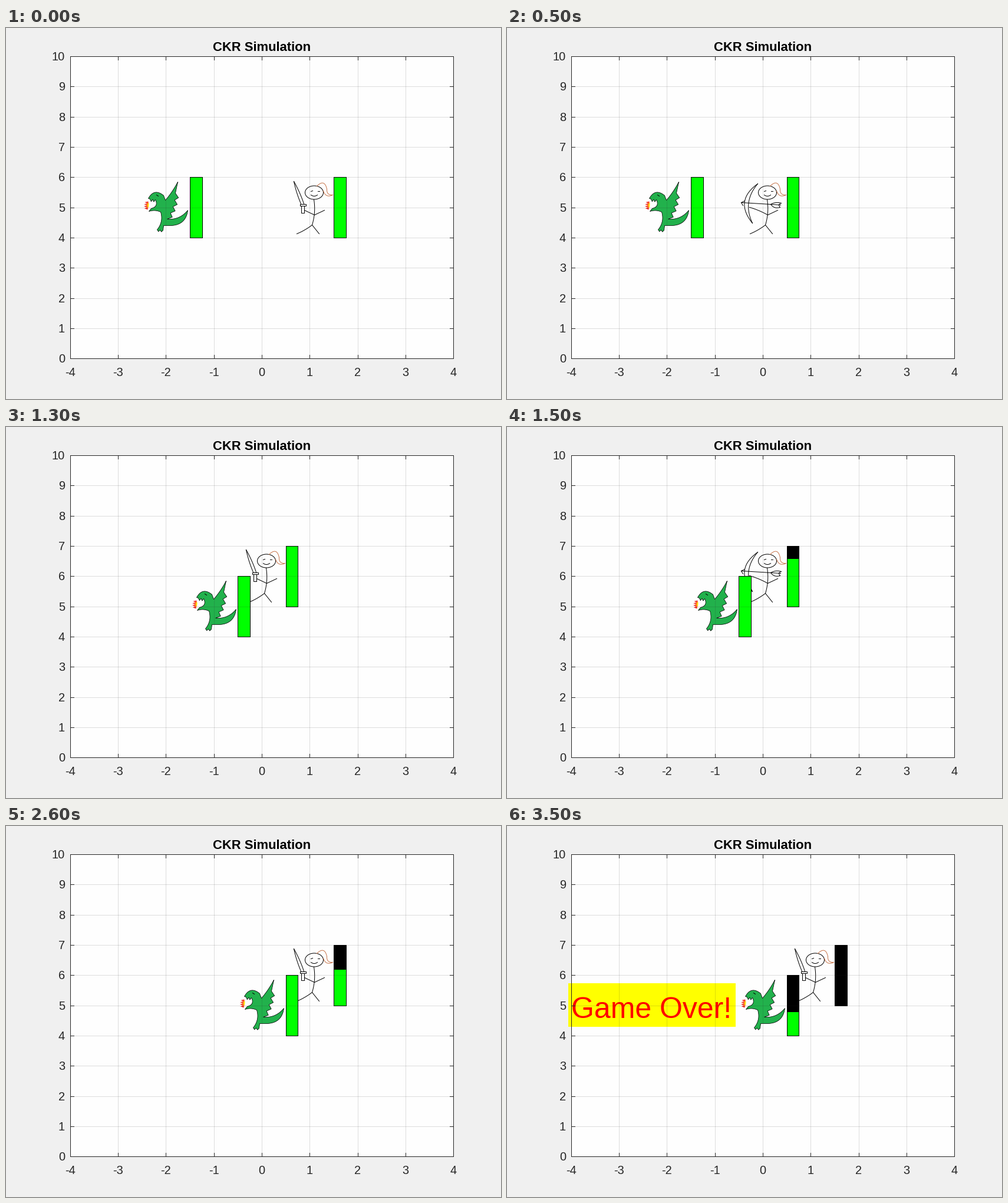
A matplotlib script for the animation above (4000 ms loop, 840 by 630 pixels).

```python
import numpy as np
import matplotlib.pyplot as plt
from matplotlib.animation import ArtistAnimation
from matplotlib.patches import Ellipse, Polygon, Rectangle

DPI = 70
PT = 72 / DPI  # points per pixel
INK, TICK, GREEN, HAIR = "#000000", "#262626", "#22b14c", "#c8764c"
plt.rcParams["font.family"] = "Liberation Sans"
plt.rcParams["axes.unicode_minus"] = False

fig = plt.figure(figsize=(840 / DPI, 630 / DPI), dpi=DPI, facecolor="#f0f0f0")
ax = fig.add_axes([0, 0, 1, 1])
ax.set_xlim(0, 840)
ax.set_ylim(629, -1)  # snapped strokes then fall on whole pixel rows
ax.axis("off")


def px(x):
    return 108.8 + 81.3 * (x + 4)


def py(y):
    return round(560.4 - 51.34 * y)


def place(x, y):
    """Centre of a sprite, on the middle of a pixel."""
    return np.array([round(px(x)) + 0.5, py(y) - 0.5])


def edge(a, b, bulge=0, teeth=0, depth=0):
    """Curve from a to b, bowed sideways by bulge, optionally saw-toothed."""
    a, b = np.array(a, float), np.array(b, float)
    dx, dy = b - a
    normal = np.array([-dy, dx]) / np.hypot(dx, dy)
    t = np.linspace(0, 1, 2 * teeth + 1 if teeth else 16)[:, None]
    points = a + (b - a) * t + 4 * bulge * t * (1 - t) * normal
    if teeth:
        points[1::2] += depth * normal
    return points


def line(points, color=INK, width=1, z=2, **kw):
    return ax.plot(*np.transpose(points), color=color, lw=width * PT, zorder=z, **kw)[0]


def fill(points, color, ec="none", z=4):
    return ax.add_patch(Polygon(points, fc=color, ec=ec, lw=0.75 * PT, zorder=z))


def box(x0, y0, x1, y1, color, ec="none", z=2):
    return ax.add_patch(Rectangle((x0, y0), x1 - x0, y1 - y0, fc=color, ec=ec,
                                  lw=PT, zorder=z))


def label(x, y, text, size, color=TICK, ha="center", z=6, **kw):
    return ax.text(x, y, text, fontsize=size * PT, color=color, ha=ha,
                   va="baseline", zorder=z, **kw)


def draw_axes():
    left, right = round(px(-4)), round(px(4))
    top, bottom = py(10), py(0)
    tick = 6
    box(left, top, right, bottom, "#fefefe", z=0)
    for x in range(-4, 5):
        u = round(px(x))
        line([(u, top), (u, bottom)], TICK, z=8, alpha=0.15)
        line([(u, bottom), (u, bottom - tick)], TICK, z=9)
        line([(u, top), (u, top + tick)], TICK, z=9)
        label(u, 590, str(x), 20)
    for y in range(11):
        v = py(y)
        line([(left, v), (right, v)], TICK, z=8, alpha=0.15)
        line([(left, v), (left + tick, v)], TICK, z=9)
        line([(right, v), (right - tick, v)], TICK, z=9)
        label(100, v + 7, str(y), 20, ha="right")
    box(left, top, right, bottom, "none", TICK, z=9)
    label(434.5, 38, "CKR Simulation", 22, INK, weight="bold")


def health_bar(x, y, health, z):
    x0, x1 = round(px(x + 0.5)), int(np.ceil(px(x + 0.75)))
    parts = [box(x0, py(y + 1), x1, py(y - 1), INK, INK, z)]
    if health > 0:
        parts.append(box(x0, py(y - 1 + 2 * health), x1, py(y - 1), "#00ff00", INK, z))
    return parts


def sword(at):
    x, y = at
    strokes = [
        edge((-27, -44), (-15, -6), 1), edge((-27, -44), (-10, -6), -1),
        edge((-9, 5), (8, 13)),
    ]
    return [line(at + s) for s in strokes] + [
        box(x - 17, y - 6, x - 7, y - 3, "none", INK),
        box(x - 15, y - 3, x - 10, y + 9, "none", INK),
    ]


def bow(at):
    top, bottom, nock = (-9, -40), (-18, 27), (13, -5)
    strokes = [
        edge(top, bottom, 18), edge(top, bottom, 11),
        edge((-36, -8), (30, -4)),
        edge((-37, -8), (-31, -11)), edge((-37, -8), (-34, -3)),
        edge(nock, (31, -7), -2), edge(nock, (29, 0), 3),
        edge((31, -7), (29, 0), 3),
        edge((-23, 0), (8, 13), -1),
    ]
    return [line(at + s) for s in strokes]


def hero(x, y, weapon):
    at = place(x, y)
    hip, shoulder = (4, 30), (8, 13)
    body = [
        edge((2, -27), (5, -28)), edge((13, -28), (16, -28)),
        edge((2, -21), (13, -21), 2),
        edge((7, -13), hip, -2.5),
        edge(hip, (-22, 45), -1), edge(hip, (16, 45)),
        edge(shoulder, (25, 5)),
    ]
    ponytail = [
        edge((12, -36), (29, -31), -8), edge((29, -31), (39, -21), 4),
        edge((23, -28), (39, -21), 5),
    ]
    head = Ellipse(at + (7.5, -25), 31, 23, fc="none", ec=INK, lw=PT, zorder=2)
    return ([ax.add_patch(head)] + weapon(at) + [line(at + s) for s in body]
            + [line(at + s, HAIR) for s in ponytail])


def dragon(x, y):
    at = place(x, y)
    outline = np.vstack([
        edge((-30, -15), (-4, -20), -8),                         # head
        edge((-1, -12), (20, -43), 1),                           # wing
        edge((16, -24), (2, 20), -3, teeth=4, depth=-6),
        edge((2, 20), (37, 5), 5), edge((37, 5), (9, 31), -8),   # tail
        edge((-4, 31), (-5, 39)),                                # leg
        edge((-5, 39), (-15, 38), teeth=2, depth=-3),
        edge((-15, 38), (-9, 8), 4),
        edge((-9, 8), (-29, 7), 2),                              # jaw
        edge((-25, 2), (-18, -13), 5),
        edge((-18, -13), (-27, -14), teeth=2, depth=-4),
    ])
    parts = [fill(at + outline, GREEN, INK), line(at + edge((-16, -21), (-13, -19)), z=4)]
    throat = np.array([-28, -4])
    flame = edge((-30, -10), (-31, 4), 2, teeth=4, depth=5) - throat
    for color, size in (("#ed1c24", 1), ("#ff7f27", 0.75), ("#fff200", 0.45)):
        parts.append(fill(at + throat + size * flame, color))
    return parts


def game_over():
    return [box(104, 266, 388, 340, "#ffff00", z=6),
            label(109, 325, "Game Over!", 50, "#ff0000", ha="left", z=7)]


def scene(hero_at, weapon, hero_health, dragon_x, dragon_health):
    parts = hero(*hero_at, weapon) + health_bar(*hero_at, hero_health, 3)
    parts += dragon(dragon_x, 5) + health_bar(dragon_x, 5, dragon_health, 5)
    return parts + (game_over() if hero_health == 0 else [])


TURNS = [
    ((1, 5), sword, 1.0, -2, 1.0),
    ((0, 5), bow, 1.0, -2, 1.0),
    ((0, 6), sword, 1.0, -1, 1.0),
    ((0, 6), bow, 0.8, -1, 1.0),
    ((1, 6), sword, 0.6, 0, 1.0),
    ((1, 6), sword, 0.6, 0, 1.0),
    ((1, 6), sword, 0.6, 0, 0.9),
    ((1, 6), sword, 0.0, 0, 0.4),
]

draw_axes()
anim = ArtistAnimation(fig, [scene(*turn) for turn in TURNS], interval=500,
                       repeat=True, repeat_delay=0, blit=False)
plt.show()
```
